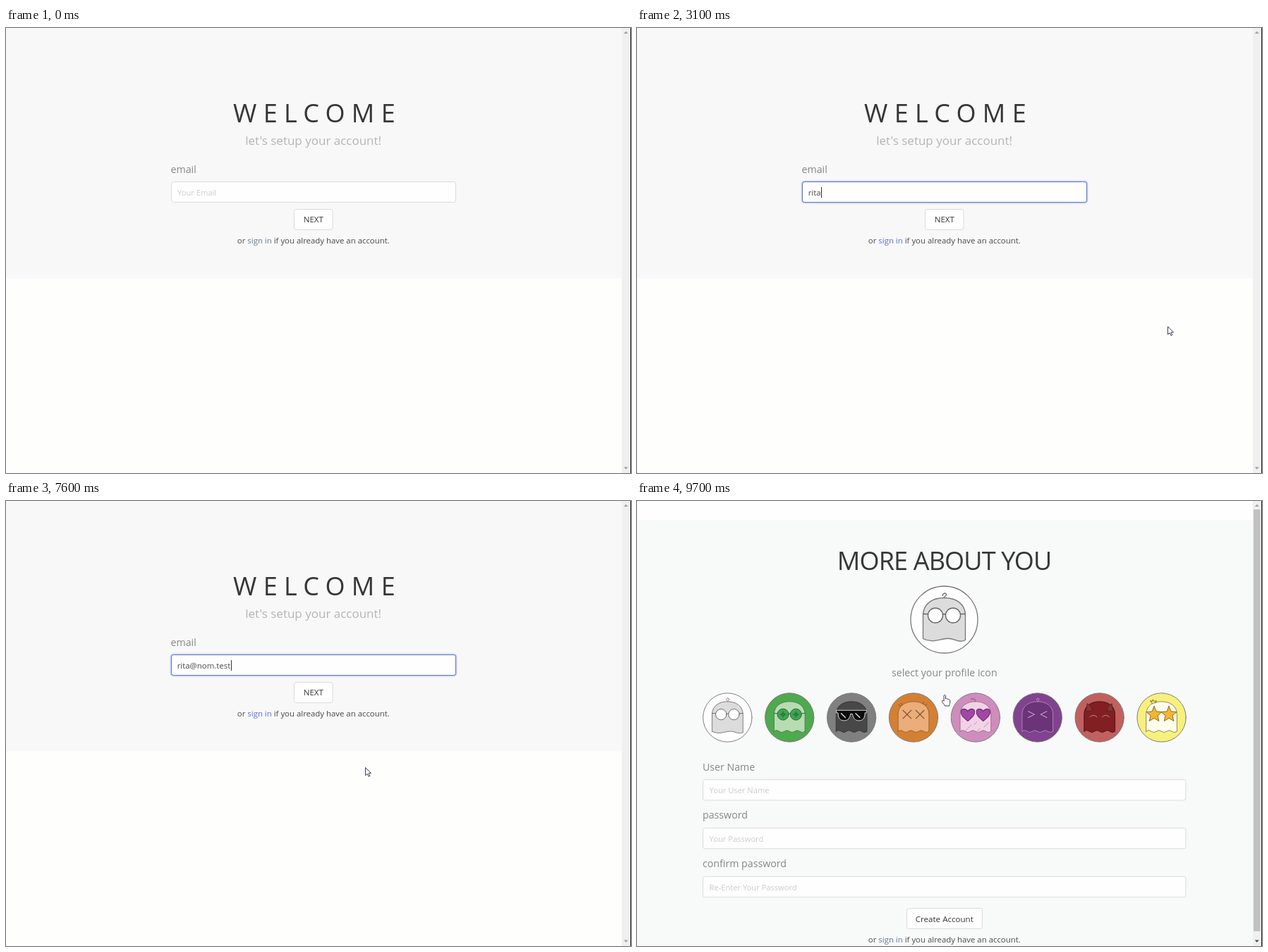
Write an HTML page that moves like this. It is 886 px wide and 632 px high and loops after 10 s.

```html
<!DOCTYPE html>
<html lang="en">
<head>
<meta charset="utf-8">
<title>Account setup</title>
<style>
  html, body { margin: 0; width: 100%; height: 100%; overflow: hidden; background: #fefefd; }
  svg { display: block; width: 886px; height: 632px; }
  text { font-family: "Open Sans", "Noto Sans", sans-serif; font-size: 11.4px; fill: #4a4a4a; white-space: pre; }
  .mid { text-anchor: middle; }
  .title { font-size: 36px; fill: #363636; }
  .sub { font-size: 17px; fill: #b4b4b4; }
  .label { font-size: 14.2px; fill: #868686; }
  .hint { font-size: 11.15px; fill: #cbcbcb; }
  .link { fill: #5b6fc6; }
  .idle .link { fill: #66788a; }
  .btn { font-size: 11.6px; fill: #363636; }
  .box { fill: #fefefe; stroke: #dbdbdb; }
  .ring { fill: none; stroke: #485fc7; stroke-opacity: .25; stroke-width: 2; }
  .edge { fill: none; stroke: #6476cf; }
  .ghost { stroke-width: 1.3; stroke-linejoin: round; stroke-linecap: round; }
</style>
</head>
<body>
<svg viewBox="0 0 886 632">
  <defs>
    <path id="heart" d="M0 10C-7 4 -12 0 -11 -6C-10 -11 -3 -11 0 -6C3 -11 10 -11 11 -6C12 0 7 4 0 10Z"/>
  </defs>

  <g id="welcome">
    <rect width="873" height="355.5" fill="#f8f8f9"/>
    <text class="title" x="322" y="133.5" letter-spacing="9.3">WELCOME</text>
    <text class="sub mid" x="435.7" y="166">let's setup your account!</text>
    <text class="label" x="233.5" y="205.5">email</text>
    <rect class="box" x="234.5" y="218.5" width="403" height="29" rx="3"/>
    <g id="fieldFocus">
      <rect class="ring" x="233.5" y="217.5" width="405" height="31" rx="4"/>
      <rect class="edge" x="234.5" y="218.5" width="403" height="29" rx="3"/>
    </g>
    <text id="hint" class="hint" x="243" y="238">Your Email</text>
    <text id="value" x="242.7" y="238"></text>
    <rect id="caret" y="226" width="1" height="15" fill="#333"/>
    <rect id="next" class="box" x="408.5" y="257.5" width="54.5" height="29" rx="3"/>
    <g id="nextFocus">
      <rect class="ring" x="407.5" y="256.5" width="56.5" height="31" rx="4"/>
      <rect class="edge" x="408.5" y="257.5" width="54.5" height="29" rx="3"/>
    </g>
    <text class="btn mid" x="435.8" y="276.3">NEXT</text>
    <text class="mid" x="435.8" y="306">or <tspan class="link">sign in</tspan> if you already have an account.</text>
  </g>

  <g id="about" class="idle">
    <rect width="873" height="632" fill="#f8f9f9"/>
    <rect width="873" height="27" fill="#fefefe"/>
    <text class="title mid" x="435.6" y="97.8" letter-spacing="-.85">MORE ABOUT YOU</text>
    <text class="label mid" x="435.8" y="248.5">select your profile icon</text>
    <g id="icons"></g>
    <g id="fields"></g>
    <rect class="box" x="382.5" y="578.5" width="107" height="29" rx="3"/>
    <text class="btn mid" x="435.8" y="598.3">Create Account</text>
    <text class="mid" x="435.8" y="627.3">or <tspan class="link">sign in</tspan> if you already have an account.</text>
  </g>

  <g>
    <rect x="873" width="12" height="632" fill="#f0f0f0"/>
    <rect id="thumb" x="874" y="12" width="9.5" height="599" fill="#c1c1c1"/>
    <path id="up" d="M875.8 8H881.8L878.8 4.6Z" fill="#a3a3a3"/>
    <path id="down" d="M875.8 623.5H881.8L878.8 627Z" fill="#a3a3a3"/>
    <rect x="885" width="1" height="632" fill="#222"/>
  </g>

  <g id="pointer" fill="#fff" stroke="#3c3c50" stroke-width="1" stroke-linejoin="round">
    <path id="arrow" d="M.5 .5V11.8L3.2 9.4L5 13.3L6.8 12.5L5.1 8.7H8.6Z"/>
    <path id="hand" d="M-1.4 8.6V1.2C-1.4 -.5 1 -.5 1 1.2V5.4C2 4.7 3.1 5 3.3 5.9C4.2 5.3 5.2 5.7 5.4 6.6C6.4 6.2 7.2 6.8 7.2 7.9V10.6C7.2 12.5 6.2 13 6 15.5H-.2C-.5 13.5 -3 11.6 -4 9.4C-4.5 8 -3 7.4 -2.2 8.2Z"/>
  </g>
</svg>

<script>
const $ = id => document.getElementById(id);
const show = (id, on) => { $(id).style.display = on ? "" : "none"; };

// Avatars, drawn around 0,0 in a circle of radius 47.5
const dome = "M-30 27V-6C-30 -23 -16 -31 0 -31S30 -23 30 -6V";
const smooth = dome + "29C20 34 14 25 2 27S-18 33 -30 27Z";
const frilly = dome + "27q-5 4 -10 0t-10 0t-10 0t-10 0t-10 0t-10 0Z";
const both = make => make(-12.5) + make(12.5);
const line = (d, color, w = 1.3) => `<path d="${d}" fill="none" stroke="${color}" stroke-width="${w}"/>`;
const disc = (x, y, r, fill, stroke) => `<circle cx="${x}" cy="${y}" r="${r}" fill="${fill}" stroke="${stroke}"/>`;

function star(x, y, r) {
  const pts = Array.from({ length: 10 }, (_, i) => {
    const a = i * Math.PI / 5 - Math.PI / 2, q = i % 2 ? r * .45 : r;
    return `${(x + q * Math.cos(a)).toFixed(1)},${(y + q * Math.sin(a)).toFixed(1)}`;
  });
  return `<polygon points="${pts.join(" ")}" fill="#f2b632" stroke="#8a6420"/>`;
}

function freckles() {
  let s = "";
  for (let i = 0; i < 18; i++)
    s += `<circle cx="${-26 + i * 17 % 53}" cy="${8 + i * 7 % 19}" r=".9" fill="#c77fb4"/>`;
  return s;
}

const curl = c => line("M0 -31C-1 -34 4 -33 3 -36C2 -39 -3 -37 -2 -34", c);
const plain = curl("#666") + line("M-30 -8H-23M23 -8H30M-2 -7Q0 -9 2 -7", "#666") +
  both(x => disc(x, -6, 10.5, "#fff", "#666"));

const looks = [
  { bg: "#fefefe", body: "#dcdcdc", ink: "#777", hem: smooth, face: plain },
  { bg: "#4fa94f", body: "#b8dcb2", ink: "#4c7a4c", hem: frilly,
    face: line("M-30 -8H30", "#27663a") +
      both(x => disc(x, -6, 11, "#3fa552", "#27663a") + line(`M${x - 6} -6H${x + 6}M${x} -12V0`, "#27763c") + disc(x, -6, 3, "#2f8c45", "#27663a")) },
  { bg: "#808080", body: "#484848", ink: "#333", hem: frilly,
    face: `<path d="M-29 -14H29V-9H26C26 2 22 6 14 6C7 6 3 1 2 -7H-2C-3 1 -7 6 -14 6C-22 6 -26 2 -26 -9H-29Z" fill="#0b0b0b" stroke="#ddd"/>` +
      line("M-20 -8L-12 0M8 -8L16 0", "#ddd", 2) },
  { bg: "#d48034", body: "#ebad79", ink: "#96612f", hem: frilly,
    face: both(x => line(`M${x - 8} -14L${x + 8} 2M${x + 8} -14L${x - 8} 2`, "#80522a", 1.6)) +
      line("M-25 -22L-29 -25M-22 -24L-24 -28M18 -26L20 -30M22 -23L26 -26", "#80522a") },
  { bg: "#cf8dbd", body: "#f1d3e6", ink: "#a3668f", hem: frilly,
    face: line("M-1 -31C3 -35 -4 -38 -9 -36", "#7d4a70") + freckles() +
      both(x => `<use href="#heart" transform="translate(${x * 1.2} -5) scale(1.2)" fill="#a347a6" stroke="#70306f"/>`) },
  { bg: "#81428f", body: "#6b3378", ink: "#b288bb", hem: frilly,
    face: curl("#b9a1bf") + line("M-18 -12L-6 -6L-18 0M18 -12L6 -6L18 0", "#c9a9d0", 1.5) },
  { bg: "#c26060", body: "#811f23", ink: "#4e1418", hem: frilly,
    face: `<path d="M-27 -12C-25 -17 -24 -24 -24 -27Q-16 -23 -14 -14ZM27 -12C25 -17 24 -24 24 -27Q16 -23 14 -14Z" fill="#9c2a2d" stroke="#333"/>` +
      line("M-19 -1Q-12 -8 -5 -1M5 -1Q12 -8 19 -1", "#d08a8a") },
  { bg: "#f7f07c", body: "#fffdec", ink: "#8a8450", hem: frilly,
    face: line("M-18 -27L-22 -33L-18 -31L-17 -35L-14 -31L-10 -33L-12 -28", "#6d6330") +
      both(x => star(x * 1.15, -6, 16)) }
];

function avatar(x, y, scale, { bg, body, ink, hem, face }) {
  return `<g class="ghost" transform="translate(${x} ${y}) scale(${scale})">` +
    disc(0, 0, 47.5, bg, "#777") + `<path d="${hem}" fill="${body}" stroke="${ink}"/>${face}</g>`;
}

$("icons").innerHTML = avatar(435.5, 168.5, 1, looks[0]) +
  looks.map((look, i) => avatar(128.3 + i * 87.9, 307.5, .73, look)).join("");

$("fields").innerHTML = [
  ["User Name", "Your User Name"],
  ["password", "Your Password"],
  ["confirm password", "Re-Enter Your Password"]
].map(([label, hint], i) => `<g transform="translate(0 ${i * 68.8})">
  <text class="label" x="93" y="382.7">${label}</text>
  <rect class="box" x="93.5" y="395.7" width="684.5" height="29.3" rx="3"/>
  <text class="hint" x="102.5" y="415">${hint}</text></g>`).join("");

// Timeline
const LOOP = 10000, FOCUS = 700, CLICK = 8800, PAGE = 9400, BLINK = 530;
const mail = "rita@nom.test";
const keys = [2800, 2900, 3000, 3100, 4300, 4600, 4800, 5000, 5100, 5700, 5800, 6000, 6200];
const path = [[2000, 753.5, 431], [2100, 752, 423.5], [7000, 752, 423.5], [7300, 640, 410],
  [7600, 509, 378], [7800, 456, 320], [8000, 436.5, 275.5]];

function place(t) {
  const i = path.findIndex(p => p[0] > t);
  if (i < 0) return path[path.length - 1].slice(1);
  const [t0, x0, y0] = path[i - 1], [t1, x1, y1] = path[i];
  const k = (t - t0) / (t1 - t0);
  return [x0 + (x1 - x0) * k, y0 + (y1 - y0) * k];
}

function draw(time) {
  const t = Math.floor(time % LOOP / 100) * 100;
  const typed = keys.filter(k => k <= t).length;
  const second = t >= PAGE;
  const focused = t >= FOCUS && t < CLICK;

  show("welcome", !second);
  show("about", second);
  show("thumb", second);
  $("down").setAttribute("fill", second ? "#505050" : "#a3a3a3");
  $("welcome").classList.toggle("idle", t < FOCUS);

  show("fieldFocus", focused);
  show("nextFocus", t >= CLICK);
  show("hint", !typed);
  $("value").textContent = mail.slice(0, typed);

  const since = t - (typed ? keys[typed - 1] : 1200) + 50;
  show("caret", focused && (since < 0 || Math.floor(since / BLINK) % 2 === 0));
  $("caret").setAttribute("x", 243 + (typed ? Math.round($("value").getComputedTextLength()) : 0));

  const over = t >= 8000;
  $("next").style.stroke = over ? "#b5b5b5" : "";
  show("pointer", t >= 2000);
  show("arrow", !over);
  show("hand", over);
  if (t >= 2000) $("pointer").setAttribute("transform", `translate(${place(t)})`);
}

const start = performance.now();
function tick() {
  draw(performance.now() - start);
  requestAnimationFrame(tick);
}
tick();
</script>
</body>
</html>
```
